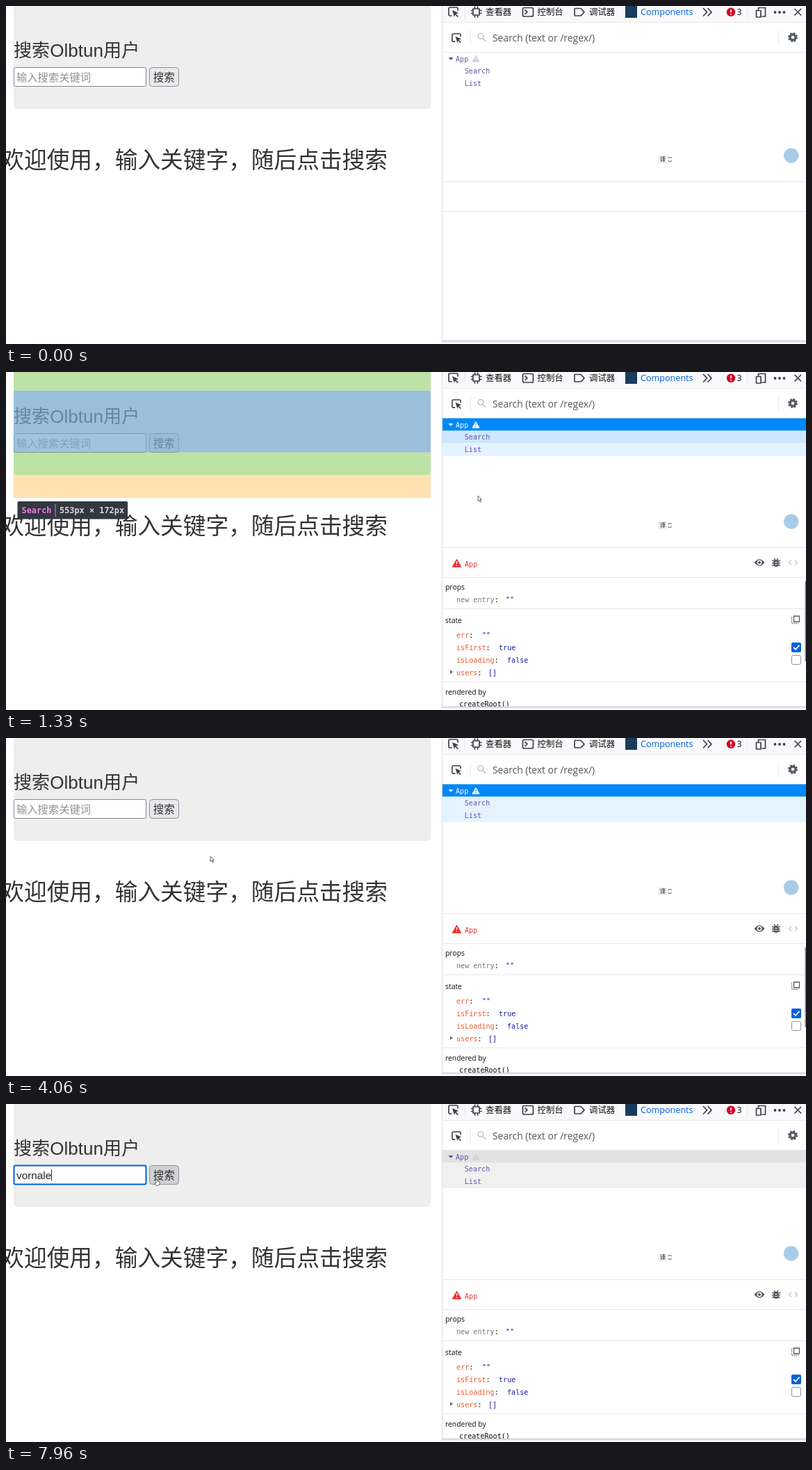
Recreate the animation shown at these times as an HTML page. Size 1151 px wide and 486 px high, loop 8000 ms.

```html
<!DOCTYPE html>
<html lang="zh">
<head>
<meta charset="utf-8">
<style>
  html, body { margin: 0; width: 100%; height: 100%; overflow: hidden; background: #fff; }
  svg { display: block; width: 100%; height: 100%; }
  text { white-space: pre; }
  .page { font-family: "Liberation Sans", "Noto Sans CJK SC", sans-serif; fill: #333; }
  .ui { font-family: "Open Sans", "Noto Sans CJK SC", sans-serif; font-size: 10.4px; fill: #111; }
  .tabs { font-size: 12.4px; }
  .mono { font-family: "DejaVu Sans Mono", monospace; font-size: 10.1px; }
  .tip { font-family: "DejaVu Sans Mono", monospace; font-size: 11.9px; font-weight: bold; }
  .icon { fill: none; stroke: #3f3f48; stroke-width: 1.7; stroke-linejoin: round; stroke-linecap: round; }
  .line { stroke: #e9e9ec; }
  .name { fill: #6a51b2; }
  .value { fill: #1a1aa6; }
  .plain { fill: #111; }
</style>
</head>
<body>
<svg viewBox="0 0 1151 486">
  <defs>
    <clipPath id="detailClip"><rect x="628" y="296" width="523" height="185"/></clipPath>
    <path id="warning" d="M0-4.6 5 4.2H-5Z" stroke-width="1" stroke-linejoin="round"/>
    <g id="picker" class="icon">
      <path d="M5 13H2.500Q1 13 1 11.500V2.500Q1 1 2.500 1H12.500Q14 1 14 2.500V5"/>
      <path d="M6 5 15 9 11.500 10.500 15 14 13.500 15 10.300 11.500 9 15Z" fill="#3f3f48" stroke="none"/>
    </g>
    <g id="copy" fill="none" stroke="#555b66" stroke-width="1.3">
      <path d="M-2.500-5H5.500V3H-2.500Z"/>
      <path d="M-5.500-4V5.500H4" stroke-dasharray="1.300 1.300"/>
    </g>
  </defs>

  <rect width="1151" height="486" fill="#fff"/>
  <g class="page">
    <path d="M11 0H611V142Q611 148 605 148H17Q11 148 11 142Z" fill="#eee"/>
    <text x="11" y="72.500" font-size="26.1">搜索Olbtun用户</text>
    <rect id="field" rx="2" fill="#fff"/>
    <text id="placeholder" x="15" y="107.800" font-size="15.3" fill="#919191">输入搜索关键词</text>
    <text id="typed" x="15" y="107.500" font-size="15.3" fill="#222"></text>
    <path id="caret" d="M.5 94V110" stroke="#222"/>
    <rect id="button" x="206.500" y="88.500" width="42" height="27" rx="4" stroke="#8f8f9d"/>
    <text x="211.700" y="107.800" font-size="15.500">搜索</text>
    <text x="-6.700" y="233" font-size="32.7">欢迎使用，输入关键字，随后点击搜索</text>
  </g>

  <g id="overlay"></g>

  <rect x="627" width="524" height="486" fill="#fff"/>
  <rect x="628" width="523" height="23" fill="#f9f9fb"/>
  <path class="line" d="M628 23.500H1151M628 66.500H1151M628 252.500H1151M628 295.500H1151M660.500 0V18M1066.500 0V18M668.500 35V56M1111.500 35V56"/>
  <path d="M627.500 0V484" stroke="#dcdcdf"/>
  <rect x="627" y="480.500" width="524" height="3" fill="#dcdcde"/>

  <!-- toolbar -->
  <use href="#picker" x="636" y="1"/>
  <g class="icon">
    <path d="M672 4H681V13H672ZM674.500 1V4M678.500 1V4M674.500 13V16M678.500 13V16M669.500 6.500H672M669.500 10.500H672M681 6.500H684M681 10.500H684"/>
    <rect x="743.500" y="2.500" width="15" height="12.500" rx="2"/><path d="M747 6 750 8.700 747 11.500"/>
    <path d="M819 3.500H827L832 8.800 827 14H819Q818 14 818 13V4.500Q818 3.500 819 3.500Z"/>
    <path d="M1003.500 3.500 1008.500 8.800 1003.500 14M1010 3.500 1015 8.800 1010 14"/>
    <path d="M1082.500 5V2.500H1092.500V15H1088M1079.500 6.500H1086V16H1079.500Z"/>
    <path d="M1135 4.500 1143.500 13M1143.500 4.500 1135 13"/>
  </g>
  <rect x="891" y="0" width="17" height="17" fill="#173c5c"/>
  <circle cx="1043" cy="8.800" r="6.200" fill="#d70022"/>
  <path d="M1043 5V9.500M1043 11.200V12.800" stroke="#fff" stroke-width="1.700"/>
  <g fill="#3f3f48"><circle cx="1106.500" cy="9" r="1.900"/><circle cx="1113" cy="9" r="1.900"/><circle cx="1119.500" cy="9" r="1.900"/></g>
  <g class="ui tabs">
    <text x="690" y="13.300">查看器</text>
    <text x="764.500" y="13.300">控制台</text>
    <text x="839" y="13.300">调试器</text>
    <text x="913" y="13.300" font-size="12.6" fill="#0060df">Components</text>
    <text x="1051.500" y="13">3</text>
    <text x="700" y="50.500" font-size="13.9" fill="#555">Search (text or /regex/)</text>
  </g>
  <use href="#picker" transform="translate(641 39) scale(.93)"/>
  <g class="icon" style="stroke:#bbb;stroke-width:1.3"><circle cx="683" cy="43.500" r="3.800"/><path d="M686 46.500 690 50.500"/></g>
  <circle cx="1132" cy="45" r="4" fill="none" stroke="#555b66" stroke-width="3.400"/>
  <circle cx="1132" cy="45" r="6" fill="none" stroke="#555b66" stroke-width="2" stroke-dasharray="2.500 2.212"/>

  <!-- component tree -->
  <rect id="rowApp" x="628" y="66.500" width="523" height="18"/>
  <rect id="rowSearch" x="628" y="84.500" width="523" height="18"/>
  <rect id="rowList" x="628" y="102.500" width="523" height="18.500"/>
  <path id="arrow" d="M636.500 74H643.500L640 78Z"/>
  <g class="mono">
    <text id="appName" x="647" y="79.600">App</text>
    <text class="name" x="659.800" y="97.400">Search</text>
    <text class="name" x="659.800" y="115.400">List</text>
  </g>
  <use id="treeWarning" href="#warning" x="676" y="76"/>
  <path id="treeMark" d="M676 73.500V76.800M676 78V79.200" stroke-width="1.100"/>

  <!-- floating widgets -->
  <rect x="938" y="215" width="12" height="11" fill="#ededed"/>
  <text class="ui" x="941" y="223.300" style="font-size:8px">译</text>
  <path d="M953 219.500V217.500H957V219.500M953 221.500V223.500H957V221.500" fill="none" stroke="#777"/>
  <circle cx="1129.700" cy="215" r="10.700" fill="#a9cbe6"/>

  <!-- details of the selected component -->
  <g id="details">
    <use href="#warning" transform="translate(648.500 275) scale(1.200)" fill="#ed3131" stroke="#ed3131"/>
    <path d="M648.500 272V276M648.500 277.500V279" stroke="#fff" stroke-width="1.300"/>
    <text class="mono" x="660" y="280" fill="#ed3131">App</text>
    <path d="M1076.500 274Q1084 264.500 1091.500 274 1084 283.500 1076.500 274Z" fill="#555b66"/>
    <circle cx="1084" cy="274" r="2.700" fill="#555b66" stroke="#fff" stroke-width="1.400"/>
    <rect x="1104.300" y="270" width="7.400" height="10" rx="3.500" fill="#555b66"/>
    <path d="M1102 271.500H1114M1102 274.800H1114M1102 278H1114M1105 268 1107 270.500M1111 268 1109 270.500" stroke="#555b66" stroke-width="1.500"/>
    <path d="M1106.500 273.500H1109.500M1106.500 276.500H1109.500" stroke="#fff"/>
    <path d="M1130 270.500 1126.500 274 1130 277.500M1135 270.500 1138.500 274 1135 277.500" fill="none" stroke="#c5c8cd" stroke-width="1.400"/>
    <g clip-path="url(#detailClip)">
      <g id="scroller">
        <path class="line" d="M628 340.500H1151M628 445.500H1151M628 509.500H1151"/>
        <g class="ui">
          <text x="632" y="313">props</text><text x="632" y="361.300">state</text>
          <text x="632" y="463.700">rendered by</text><text x="632" y="530">source</text>
        </g>
        <g id="fields" class="mono"></g>
        <path d="M639 428.500 643 431.300 639 434Z" fill="#666"/>
        <use href="#copy" x="1136" y="356"/><use href="#copy" x="1136" y="525"/>
        <rect x="1130" y="389" width="14" height="14" rx="2" fill="#0060df"/>
        <path d="M1133 396 1136 399 1141.500 392.800" fill="none" stroke="#fff" stroke-width="1.800"/>
        <rect x="1130.500" y="407.500" width="13" height="13" rx="2" fill="#fff" stroke="#8f8f9d"/>
      </g>
    </g>
    <rect id="scrollbar" x="1149.500" y="301" width="1.500" height="115" fill="#85858a"/>
  </g>

  <g id="cursor">
    <path data-shape="arrow" d="M0 0V7.600L1.900 6 3.200 9 4.500 8.400 3.200 5.600H5.600Z" fill="#fff" stroke="#444" stroke-width=".8"/>
    <path data-shape="beam" d="M-2-4H2M0-4V4M-2 4H2" fill="none" stroke="#555" stroke-width=".9"/>
    <path data-shape="hand" d="M-1-4Q0-5 1-4V-1L4 0V3L3 5H-1L-3.500 1.500-2.500 1-1 2Z" fill="#fff" stroke="#444" stroke-width=".8"/>
  </g>
</svg>
<script>
const LOOP = 8000, WORD = "vornale", SCROLL = 76;
const $ = id => document.getElementById(id);
const set = (id, attrs) => { for (const k in attrs) $(id).setAttribute(k, attrs[k]); };
const show = (el, on) => { el.style.display = on ? "" : "none"; };
const clamp = p => Math.min(1, Math.max(0, p));

// Bursts of movement: first change, last change, number of changes
const bursts = [[80, 820, 10], [990, 1730, 10], [1830, 2410, 8], [2820, 2820, 1], [3150, 3550, 6],
  [3720, 4060, 5], [4220, 4970, 10], [5060, 5140, 2], [5560, 5640, 2], [5890, 5890, 1], [6140, 6230, 2],
  [6390, 6640, 4], [6820, 6900, 2], [7230, 7230, 1], [7560, 7960, 6]];
const path = [[80, 706, 470], [330, 676, 250], [490, 660, 126], [573, 665, 98], [738, 654, 80], [820, 652, 77],
  [1070, 652, 77], [1319, 679, 178], [1480, 560, 190], [1730, 126, 44], [2080, 440, 250], [2250, 640, 352],
  [2330, 718, 340], [2410, 727, 297], [3550, 727, 297], [3800, 640, 318], [4060, 294, 170], [4400, 250, 152],
  [4720, 150, 74], [4970, 107, 102], [7560, 107, 102], [7880, 200, 109], [7960, 217, 112]];
const shapes = [[0, ""], [80, "arrow"], [2400, "beam"], [3720, "arrow"], [4800, "beam"], [5560, ""], [7640, "beam"], [7880, "hand"]];
const highlights = [[0, ""], [490, "List"], [650, "Search"], [735, "App"], [1230, "Search"], [1400, ""]];
const keystrokes = [5560, 5890, 6140, 6390, 6550, 6820, 6900];

const fields = [
  ["new entry", 330.5, 719, '""', "#777"], ["err", 381.5, 685, '""'], ["isFirst", 399.6, 709, "true"],
  ["isLoading", 417.6, 721, "false"], ["users", 435.8, 694, "[]"]];
$("fields").innerHTML = fields.map(([key, y, x, value, color = "#ef5a28"]) =>
  `<text x="648" y="${y}"><tspan fill="${color}">${key}</tspan><tspan class="plain">:</tspan></text>
   <text class="value" x="${x}" y="${y}">${value}</text>`).join("") +
  [[652, 480.8, "createRoot()"], [652, 499, "react-dom@19.0.0"], [648, 549.7, "bundle.js:30476"]]
    .map(([x, y, s]) => `<text class="plain" x="${x}" y="${y}">${s}</text>`).join("");

const CONTENT = "rgba(120,170,210,.7)", PADDING = "rgba(77,200,0,.3)", MARGIN = "rgba(255,155,0,.3)";
const box = (x, y, right, bottom, fill) =>
  `<rect x="${x}" y="${y}" width="${right - x}" height="${bottom - y}" fill="${fill}"/>`;

function tooltip(x, y, name, size) {
  const advance = 7.165, divider = x + 11.5 + name.length * advance;
  const right = divider + 11 + size.length * advance;
  return box(x, y, right, y + 25.5, "#333740").replace("/>", ' rx="2"/>') +
    box(divider - .5, y + 4, divider + .5, y + 22, "#a5a7ab") +
    `<text class="tip" x="${x + 6}" y="${y + 17.3}" fill="#ee78e6">${name}</text>
     <text class="tip" x="${divider + 6}" y="${y + 17.3}" fill="#d7d7d7">${size}</text>`;
}

const overlays = {
  "": "",
  App: box(0, 0, 627, 249, CONTENT) + tooltip(0, 254, "App", "583px × 235px"),
  Search: box(11, 0, 611, 27, PADDING) + box(11, 27, 611, 115.5, CONTENT) + box(11, 115.5, 611, 148, PADDING) +
    box(11, 148, 611, 181, MARGIN) + tooltip(16.5, 186, "Search", "553px × 172px"),
  List: box(11, 181, 14.5, 249, MARGIN) + box(14.5, 181, 627, 249, CONTENT) + tooltip(16.5, 254, "List", "553px × 63px")
};

function snap(t) {
  let time = 0;
  for (const [from, to, count] of bursts) {
    if (t < from) break;
    const gap = count > 1 ? (to - from) / (count - 1) : 1;
    time = from + Math.min(count - 1, Math.floor((t - from + 5) / gap)) * gap;
  }
  return time;
}

const latest = (steps, t) => steps.filter(([at]) => t >= at - .01).pop()[1];

function position(t) {
  const i = path.findIndex(([at]) => at >= t);
  if (i < 1) return path[i < 0 ? path.length - 1 : 0].slice(1);
  const [a, x, y] = path[i - 1], [b, X, Y] = path[i], p = (t - a) / (b - a);
  return [x + (X - x) * p, y + (Y - y) * p];
}

function scrollOffset(t) {
  if (t < 2820) return 0;
  return SCROLL * (1 - (t < 3150 ? 0 : clamp((t - 3070) / 480))) ** 2;
}

let shownOverlay = "";
function draw(now) {
  const t = snap(now % LOOP);
  const selected = t >= 990, focused = t >= 5060, active = selected && !focused;
  const highlight = latest(highlights, t);

  if (highlight !== shownOverlay) $("overlay").innerHTML = overlays[shownOverlay = highlight];

  const child = !selected ? "none" : focused ? "#f0f0f0" : "#e5f3fe";
  set("rowApp", { fill: active ? "#0088fa" : focused ? "#e2e2e2" : highlight === "App" ? "#e5f3fe" : "none" });
  set("rowSearch", { fill: active && highlight === "Search" ? "#cce7fe" : child });
  set("rowList", { fill: child });
  set("appName", { fill: active ? "#fff" : "#6a51b2" });
  set("arrow", { fill: active ? "#fff" : "#555b66" });
  const warning = active ? "#fff" : "#cfd1d5";
  set("treeWarning", { fill: warning, stroke: warning });
  set("treeMark", { stroke: active ? "#0088fa" : focused ? "#e2e2e2" : "#fff" });

  show($("details"), t >= 1070);
  const offset = scrollOffset(t);
  set("scroller", { transform: `translate(0 ${-offset})` });
  set("scrollbar", { y: 301 + offset * 59 / SCROLL, opacity: 1 - clamp((t - 6310) / 330) });

  set("field", focused
    ? { x: 11.5, y: 88.5, width: 190, height: 27, stroke: "#0060df", "stroke-width": 2 }
    : { x: 11.5, y: 88.5, width: 190, height: 27, stroke: "#85858f", "stroke-width": 1 });
  const count = keystrokes.filter(at => t >= at).length;
  $("typed").textContent = WORD.slice(0, count);
  show($("placeholder"), !count);
  show($("caret"), focused && !(t >= 7230 && t < 7560));
  set("caret", { transform: `translate(${Math.round(15 + (count ? $("typed").getComputedTextLength() : 0))} 0)` });
  set("button", { fill: t >= 7880 - .01 ? "#d0d0d7" : "#e9e9ed" });

  const shape = latest(shapes, t);
  for (const el of $("cursor").children) show(el, el.dataset.shape === shape);
  set("cursor", { transform: `translate(${position(t)})` });
}

const start = performance.now();
(function tick() {
  draw(performance.now() - start);
  requestAnimationFrame(tick);
})();
</script>
</body>
</html>
```
